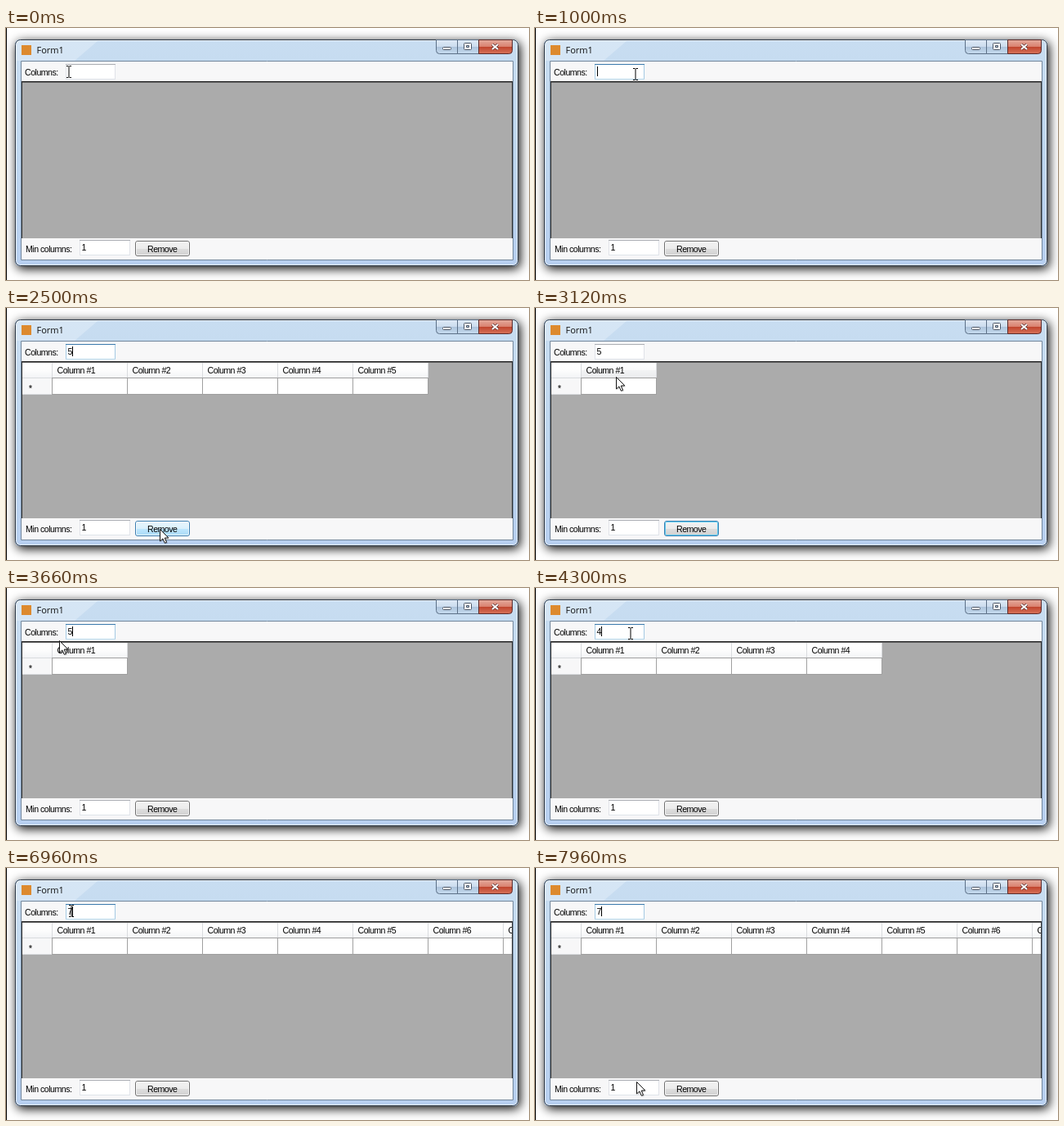
An HTML page with a canvas for the animation above (8 s loop, 640 by 308 pixels).

```html
<!DOCTYPE html>
<html lang="en">
<head>
<meta charset="utf-8">
<title>Form1</title>
<style>
html, body { margin: 0; width: 100%; height: 100%; overflow: hidden; background: #fff; }
canvas { display: block; width: 640px; height: 308px; }
</style>
</head>
<body>
<canvas id="stage"></canvas>
<script>
const LOOP = 8000, TICK = 60, BLINK = 530, SELECT_LEAD = 600;
const canvas = document.getElementById('stage');
const ratio = window.devicePixelRatio || 1;
canvas.width = 640 * ratio;
canvas.height = 308 * ratio;
const ctx = canvas.getContext('2d');
ctx.scale(ratio, ratio);

const SANS = '"Liberation Sans", Arial, sans-serif';
const WINDOW = { x: 11, y: 14, w: 616, h: 277 };
const GRID = { x: 19, y: 65, w: 601, h: 192 };
const FIELD = { x: 73, y: 44, w: 61, h: 19 };
const BUTTON = { x: 158, y: 260.5, w: 67, h: 19 };
const FIRST = 56, COL = 92;

// Form events
const clickField = [610, 3480], press = 2700, remove = 2820;
const typed = [[1370, 5], [4300, 4], [5690, 5], [6890, 7]];

// Pointer glides: start, end, target x and y, sideways bow
const glides = [
  [60, 670, 123, 56], [1900, 2500, 188, 270], [2820, 3480, 86, 57],
  [3540, 3780, 64, 64], [3780, 4100, 117, 55],
  [4830, 5230, 65, 63], [5230, 5630, 114, 57],
  [5890, 6010, 108, 56], [6210, 6460, 76, 53], [6660, 6960, 80, 52],
  [7420, 7960, 124, 261, 62]
];

const inside = (r, x, y) => x >= r.x && x < r.x + r.w && y >= r.y && y < r.y + r.h;
const easeOut = u => 1 - (1 - u) ** 3;

function pointer(t) {
  let x = 77, y = 53;
  for (const [start, end, toX, toY, bow = 0] of glides) {
    if (t < start) break;
    const step = (Math.floor((t - start) / TICK) + 1) * TICK;
    const u = t >= end ? 1 : easeOut(Math.min(1, step / (end - start + TICK)));
    x += (toX - x) * u + bow * Math.sin(Math.PI * u);
    y += (toY - y) * u;
  }
  return { x: Math.round(x), y: Math.round(y) };
}

function formState(t) {
  const last = typed.findLast(k => k[0] <= t);
  const next = typed.find(k => k[0] > t);
  const digit = last ? last[1] : 0;
  const removed = t >= remove && last[0] < remove;
  const focus = t < clickField[0] ? '' : t >= press && t < clickField[1] ? 'button' : 'field';
  const caretFrom = Math.max(...[...clickField, ...typed.map(k => k[0])].filter(k => k <= t));
  return {
    text: digit ? String(digit) : '',
    cols: removed ? 1 : digit,
    selected: Boolean(last && next && t >= next[0] - SELECT_LEAD),
    caret: focus === 'field' && Math.floor((t - caretFrom) / BLINK) % 2 === 0,
    pressed: t >= press && t < remove,
    focus
  };
}

function rect(x, y, w, h, fill) {
  ctx.fillStyle = fill;
  ctx.fillRect(x, y, w, h);
}

function paint(fill, stroke) {
  if (fill) { ctx.fillStyle = fill; ctx.fill(); }
  if (stroke) { ctx.strokeStyle = stroke; ctx.lineWidth = 1; ctx.stroke(); }
}

function round(x, y, w, h, r, fill, stroke) {
  ctx.beginPath();
  ctx.roundRect(x, y, w, h, r);
  paint(fill, stroke);
}

function poly(points, fill, stroke) {
  ctx.beginPath();
  points.forEach(([x, y]) => ctx.lineTo(x, y));
  ctx.closePath();
  paint(fill, stroke);
}

function shade(y, h, ...colors) {
  const g = ctx.createLinearGradient(0, y, 0, y + h);
  colors.forEach((c, i) => g.addColorStop(i / (colors.length - 1), c));
  return g;
}

// Two-tone fill with a hard break in the middle
function glass(y, h, a, b, c, d) {
  const g = ctx.createLinearGradient(0, y, 0, y + h);
  [[0, a], [0.5, b], [0.5, c], [1, d]].forEach(s => g.addColorStop(...s));
  return g;
}

function label(text, x, y, color = '#000') {
  ctx.font = '10.6px ' + SANS;
  ctx.letterSpacing = '-0.5px';
  ctx.fillStyle = color;
  ctx.fillText(text, x, y);
}

function drawWindow() {
  const { x, y, w, h } = WINDOW;
  rect(0, 0, 640, 308, '#fff');
  rect(0, 0, 1, 308, '#000');

  ctx.save();
  ctx.shadowColor = '#000';
  ctx.shadowBlur = 13 * ratio;
  ctx.shadowOffsetX = 2 * ratio;
  ctx.shadowOffsetY = 3 * ratio;
  round(x, y, w, h, 6, '#bcd3ec');
  ctx.restore();

  round(x, y, w, h, 6, shade(y, h, '#c8ddf1', '#bfd7ef', '#b7cff0'));
  poly([[x + 2, y + 2], [112, y + 2], [84, 40], [x + 2, 40]], 'rgba(255,255,255,.25)');
  round(x + 1.5, y + 1.5, w - 3, h - 3, 5, null, 'rgba(255,255,255,.65)');
  round(x + 0.5, y + 0.5, w - 1, h - 1, 6, null, '#2e3a48');
  round(18.5, 40.5, 602, 243, 0, '#f7f7f8', '#71869c');

  rect(19, 21, 12, 12, '#dd8a2e');
  ctx.font = '11px "Open Sans", sans-serif';
  ctx.letterSpacing = '0px';
  ctx.fillStyle = '#111';
  ctx.fillText('Form1', 37.5, 31);
  drawControls(y + 0.5);
}

function drawControls(y) {
  const blue = glass(y, 17, '#dfeaf6', '#cbdcee', '#adc4dc', '#c5daee');
  const red = glass(y, 17, '#e4aa9c', '#d9806e', '#c0432c', '#d6735a');
  round(526.5, y, 26, 17, [0, 0, 0, 4], blue, '#5b6f86');
  round(552.5, y, 26, 17, 0, blue, '#5b6f86');
  round(578.5, y, 41, 17, [0, 0, 4, 0], red, '#5a2a2a');

  round(534.5, 23.5, 10, 3, 1, '#fff', '#4d5766');
  round(560.5, 18.5, 9, 8, 1, '#fff', '#4d5766');
  round(563.5, 21.5, 3, 2, 0, '#b5cbe2', '#4d5766');

  for (const [color, width] of [['#5c3030', 3.6], ['#fff', 2]]) {
    ctx.strokeStyle = color;
    ctx.lineWidth = width;
    ctx.beginPath();
    for (const side of [-1, 1]) {
      ctx.moveTo(598.5 - side * 3.5, 20);
      ctx.lineTo(598.5 + side * 3.5, 26);
    }
    ctx.stroke();
  }
}

function drawBox({ x, y, w, h }, focused) {
  const [top, side, bottom] = focused
    ? ['#3d7bad', '#a4c9e3', '#b7d9ed']
    : ['#abadb3', '#e0e2e8', '#dfe4ea'];
  rect(x, y, w, h, side);
  rect(x + 1, y + 1, w - 2, h - 2, '#fff');
  rect(x, y, w, 1, top);
  rect(x, y + h - 1, w, 1, bottom);
}

function drawField({ text, selected, caret, focus }) {
  label('Columns:', 23, 58);
  drawBox(FIELD, focus === 'field');
  if (selected) rect(76, 47, 6, 13, '#3399ff');
  label(text, 75.5, 57, selected ? '#fff' : '#000');
  if (caret && !selected) rect(text ? 81 : 76, 47, 1, 12, '#000');
}

function drawGrid(cols, p) {
  const { x, y, w, h } = GRID;
  const line = '#a0a0a0', soft = '#d9dbde';
  rect(x, y, w, h, '#ababab');
  rect(x, y, w, 1.5, '#222');
  rect(x, y, 1, h, '#333');
  rect(x + w - 1, y, 1, h, '#333');
  if (!cols) return;

  ctx.save();
  ctx.beginPath();
  ctx.rect(x + 1, y + 1.5, w - 2, h);
  ctx.clip();
  const wide = cols * COL;
  rect(20, 67, 36 + wide, 18, shade(67, 18, '#fff', '#fdfdfd', '#f3f4f6'));
  rect(20, 85, 37, 21, '#f7f7f8');
  rect(20, 85, 37, 1, soft);
  rect(20, 105, 37, 1, soft);
  rect(FIRST, 67, 1, 18, soft);
  rect(FIRST, 85, wide + 1, 21, line);
  ctx.font = 'bold 10px ' + SANS;
  ctx.fillStyle = '#333';
  ctx.fillText('*', 28, 101.5);

  for (let i = 0; i < cols; i++) {
    const left = FIRST + i * COL;
    if (inside({ x: left, y: 67, w: COL, h: 18 }, p.x, p.y)) {
      rect(left + 1, 67, COL - 1, 18, glass(67, 18, '#fff', '#fafafa', '#f2f3f4', '#ebecee'));
    }
    rect(left + COL, 67, 1, 18, soft);
    rect(left + 1, 86, COL - 1, 19, '#fff');
    label('Column #' + (i + 1), left + 6.5, 80);
  }
  ctx.restore();
}

function drawButton(focused, hover, pressed) {
  const { x, y, w, h } = BUTTON;
  let fill = glass(y, h, '#f3f3f3', '#ebebeb', '#dddddd', '#cfcfcf');
  if (hover) fill = glass(y, h, '#eaf6fd', '#d9f0fc', '#bee6fd', '#a7d9f5');
  if (pressed) fill = glass(y, h, '#e5f4fc', '#c4e5f6', '#98d1ef', '#68b3db');
  const inner = focused && !hover ? '#5ecbf0' : 'rgba(255,255,255,.75)';
  round(x + 0.5, y, w - 1, h - 1, 2.5, fill, focused || hover ? '#3c7fb1' : '#707070');
  round(x + 1.5, y + 1, w - 3, h - 3, 1.5, null, inner);
  label('Remove', 173, 274);
}

function drawFooter(state, p) {
  label('Min columns:', 24, 274);
  drawBox({ x: 90, y: 259, w: 62, h: 19 }, false);
  label('1', 92.5, 272);
  drawButton(state.focus === 'button', inside(BUTTON, p.x, p.y), state.pressed);
}

function drawBeam(x, y) {
  rect(x - 0.5, y - 6, 1, 13, '#000');
  for (const end of [y - 7, y + 7]) {
    rect(x - 3, end, 2.5, 1, '#000');
    rect(x + 0.5, end, 2.5, 1, '#000');
  }
}

function drawArrow(x, y) {
  const shape = [[0, 0], [0, 14.5], [3.4, 11.4], [5.8, 16.8], [8, 15.8], [5.7, 10.6], [10.3, 10.4]];
  const at = d => shape.map(([a, b]) => [x + a + d, y + b + d]);
  poly(at(1.8), 'rgba(0,0,0,.22)');
  poly(at(0.5), '#fff', '#111');
}

function render(t) {
  const state = formState(t), p = pointer(t);
  drawWindow();
  drawGrid(state.cols, p);
  drawField(state);
  drawFooter(state, p);
  const beam = state.selected || inside(FIELD, p.x, p.y);
  (beam ? drawBeam : drawArrow)(p.x, p.y);
}

const begin = performance.now();
function tick(now) {
  render(Math.max(0, now - begin) % LOOP);
  requestAnimationFrame(tick);
}
render(0);
requestAnimationFrame(tick);
</script>
</body>
</html>
```
